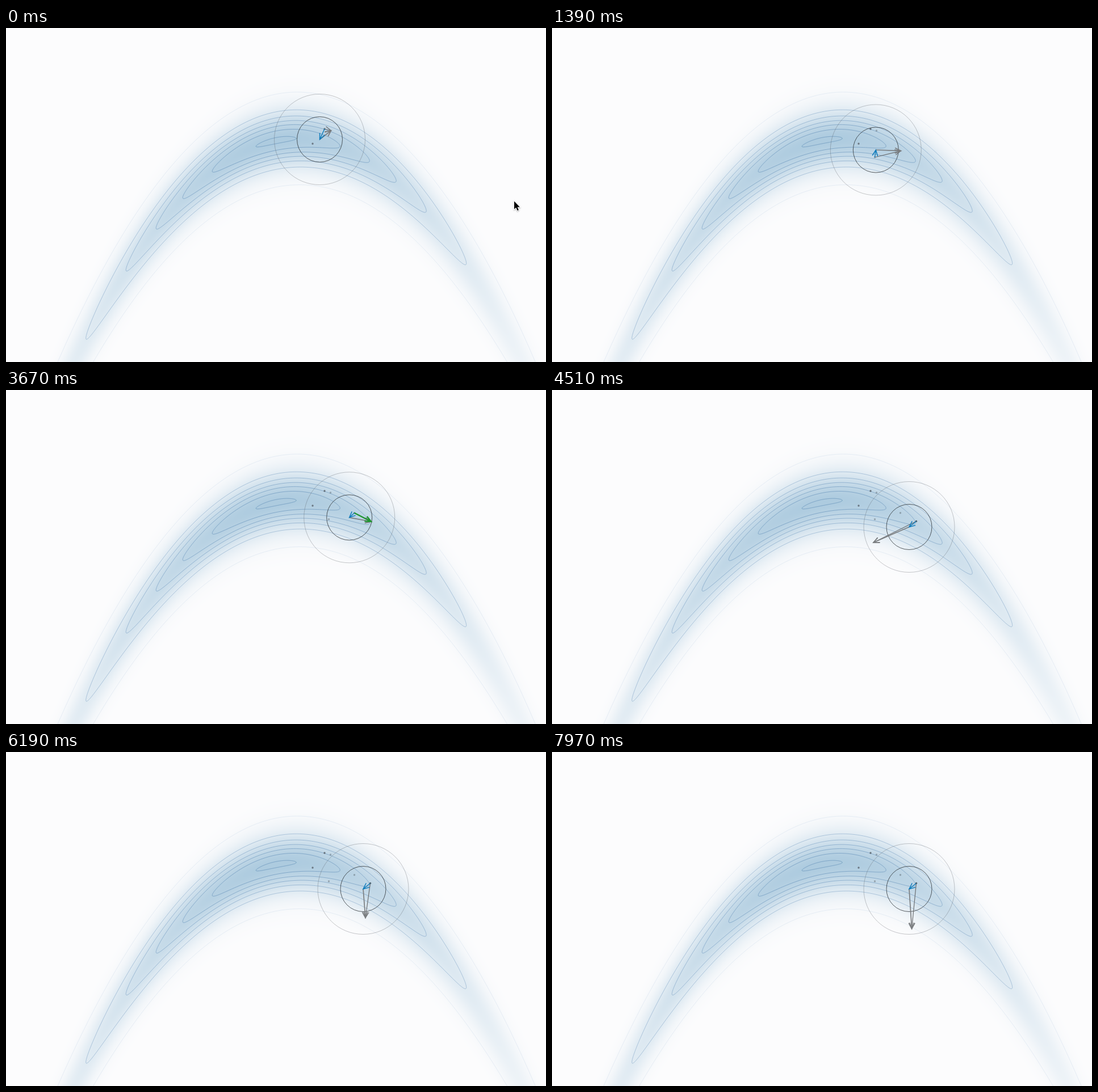
Animation of 951 by 589 pixels, one loop 7990 ms. Source, as an HTML page with a canvas:

```html
<!DOCTYPE html>
<html lang="en">
<head>
<meta charset="utf-8">
<title>Langevin sampling of a curved density</title>
<style>
  html, body { margin: 0; width: 100%; height: 100%; overflow: hidden; background: #fcfcfd; }
  canvas { display: block; }
</style>
</head>
<body>
<canvas id="stage" width="951" height="589"></canvas>
<script>
const W = 951, H = 589, LOOP = 7990;
const ctx = document.getElementById('stage').getContext('2d');

// Density: a sheared Gaussian bent along a parabola.
const MODE_X = 475.7, MODE_Y = 198.6, SHEAR = 0.197, BEND = 0.002516, THICK = 0.1515, SPREAD = 62000;
const ridge = x => MODE_Y - SHEAR * x + BEND * x * x;
const radii = [541, 335, 264.5, 211.5, 164.5, 112.5, 35.5];

const GREY = '#7b7e81', DARK = '#6a6d70', BLUE = '#0f7cbc', GREEN = '#1f9630', RED = '#f01505';

const chain = [[540, 204], [561, 178], [571.5, 181], [568.5, 228], [613.5, 216.7], [641.5, 231.5]];
const dotAlpha = [0.6, 0.65, 0.32, 0.36, 0.34, 0.8];

// from: index in chain; mean: drifted centre; decide: when the verdict colour appears
const steps = [
  { start: 0, decide: 300, from: 1, mean: [552.5, 196.5], to: [572.5, 181], color: GREEN },
  { start: 640, decide: 990, from: 2, mean: [562.5, 198.5], to: chain[3], color: GREEN },
  { start: 1340, decide: 2090, from: 3, mean: [570.3, 215], to: [614.5, 216.7], color: GREEN },
  { start: 2840, decide: 3590, from: 4, mean: [604.7, 224.8], to: [643, 232], color: GREEN },
  { start: 4340, decide: 5090, from: 5, mean: [629, 241.5], to: [566, 269], color: RED },
  { start: 5840, decide: 6590, from: 5, mean: [629, 241.5], to: [633, 292.5], color: RED },
  { start: 7340, decide: 8090, from: 5, mean: [629, 241.5], to: [633.6, 311.8], color: RED }
];

function makeBackground() {
  const layer = document.createElement('canvas');
  layer.width = W;
  layer.height = H;
  const g = layer.getContext('2d');
  const image = g.createImageData(W, H);
  const base = [252, 252, 253], depth = [79, 49, 30];
  for (let py = 0, i = 0; py < H; py++) {
    for (let px = 0; px < W; px++, i += 4) {
      const x = px + 0.5 - MODE_X;
      const v = (py + 0.5 - ridge(x)) / THICK;
      const tone = Math.exp(-0.57 * (x * x + v * v) / SPREAD);
      for (let c = 0; c < 3; c++) image.data[i + c] = base[c] - depth[c] * tone;
      image.data[i + 3] = 255;
    }
  }
  g.putImageData(image, 0, 0);

  g.lineWidth = 1;
  radii.forEach((r, level) => {
    g.strokeStyle = `rgba(84,132,178,${level ? 0.34 + level * 0.04 : 0.11})`;
    g.beginPath();
    for (let k = 0; k <= 400; k++) {
      const a = k / 400 * Math.PI * 2;
      const x = r * Math.sin(a);
      g.lineTo(MODE_X + x, ridge(x) - THICK * r * Math.cos(a));
    }
    g.stroke();
  });
  return layer;
}

function circle([x, y], r, color) {
  ctx.strokeStyle = color;
  ctx.lineWidth = 1;
  ctx.beginPath();
  ctx.arc(x, y, r, 0, Math.PI * 2);
  ctx.stroke();
}

function arrow([x0, y0], [x1, y1], color, width) {
  const back = Math.atan2(y0 - y1, x0 - x1), size = 11.5, spread = 0.42;
  const barb = a => [x1 + size * Math.cos(a), y1 + size * Math.sin(a)];
  ctx.strokeStyle = color;
  ctx.lineWidth = width;
  ctx.beginPath();
  ctx.moveTo(x0, y0);
  ctx.lineTo(x1, y1);
  ctx.moveTo(...barb(back - spread));
  ctx.lineTo(x1, y1);
  ctx.lineTo(...barb(back + spread));
  ctx.stroke();
}

function dots(last) {
  for (let i = 0; i <= last; i++) {
    ctx.fillStyle = `rgba(60,64,70,${dotAlpha[i]})`;
    ctx.beginPath();
    ctx.arc(chain[i][0], chain[i][1], 1.7, 0, Math.PI * 2);
    ctx.fill();
  }
}

function pointer(t) {
  const p = Math.min(1, Math.max(0, (t - 30) / 360));
  const ease = p * p * (3 - 2 * p);
  if (ease === 1) return;
  ctx.save();
  ctx.translate(895 + 22 * ease, 305.5 + 290 * ease);
  ctx.beginPath();
  [[0, 0], [0, 14], [3.2, 11], [5.6, 16.6], [7.9, 15.6], [5.5, 10.2], [9.8, 10.2]]
    .forEach(p => ctx.lineTo(...p));
  ctx.closePath();
  ctx.shadowColor = 'rgba(0,0,0,0.3)';
  ctx.shadowBlur = 2;
  ctx.shadowOffsetY = 1;
  ctx.strokeStyle = '#fff';
  ctx.lineWidth = 2;
  ctx.stroke();
  ctx.shadowColor = 'transparent';
  ctx.fillStyle = '#000';
  ctx.fill();
  ctx.restore();
}

const background = makeBackground();

function draw(t) {
  const step = steps.findLast(s => t >= s.start);
  const from = chain[step.from];
  ctx.drawImage(background, 0, 0);
  dots(step.from);
  circle(step.mean, 80, 'rgba(70,75,80,0.3)');
  circle(step.mean, 40, 'rgba(45,50,55,0.78)');
  arrow(from, step.to, DARK, 1.2);
  arrow(step.mean, step.to, GREY, 1.7);
  arrow(from, step.mean, BLUE, 1.5);
  if (t >= step.decide) arrow(from, step.to, step.color, 2.3);
  pointer(t);
}

const begin = performance.now();
function tick() {
  draw((performance.now() - begin) % LOOP);
  requestAnimationFrame(tick);
}
tick();
</script>
</body>
</html>
```
